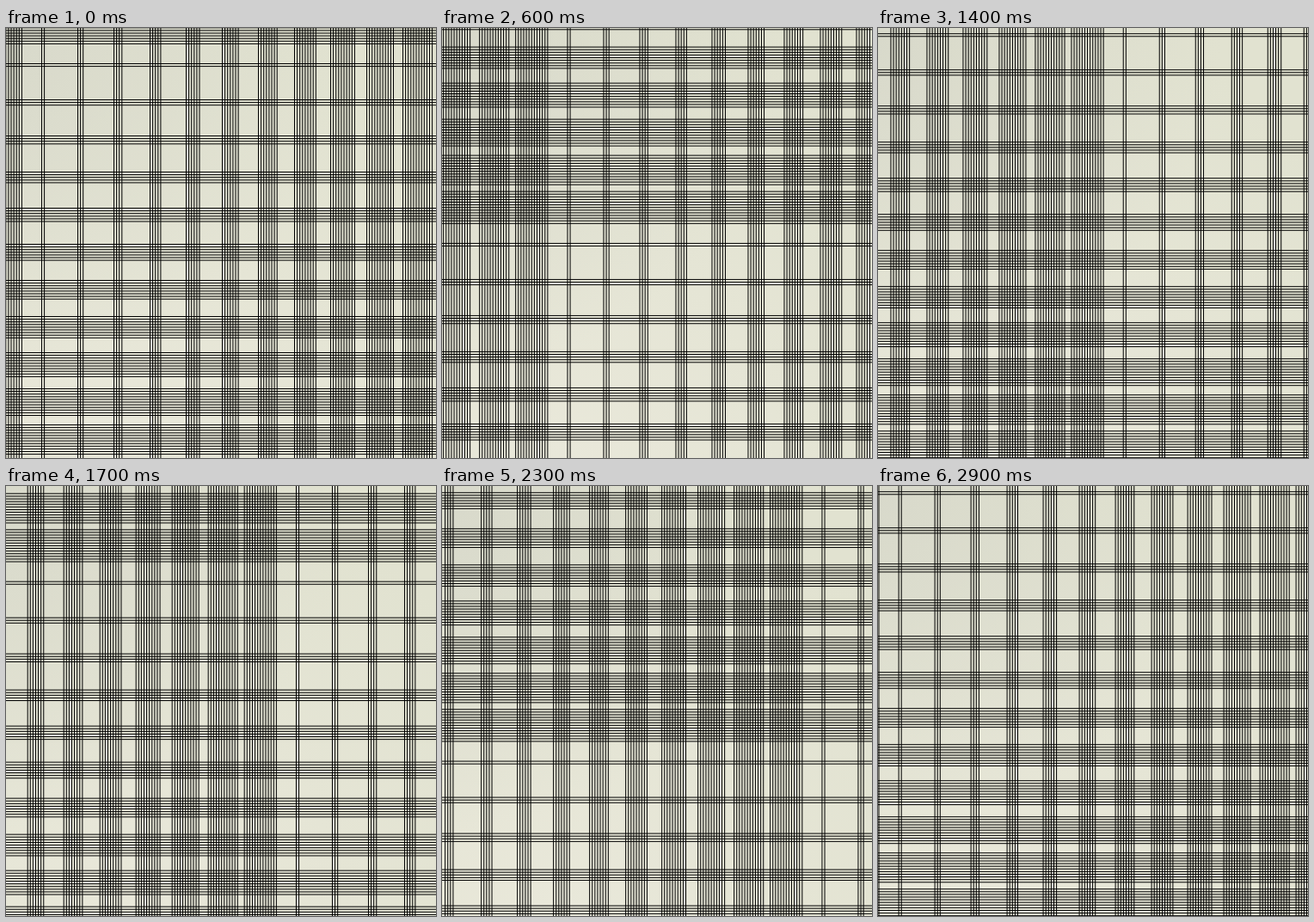
Animation, 500 px wide and 500 px high, one loop 3000 ms. Source, as an HTML page with a canvas:

```html
<!DOCTYPE html>
<html lang="en">
<head>
<meta charset="utf-8">
<title>Plaid</title>
<style>
  html, body { margin: 0; width: 100%; height: 100%; overflow: hidden; background: #e4e3d4; }
  canvas { display: block; }
</style>
</head>
<body>
<canvas id="stage" width="500" height="500"></canvas>
<script>
const SIZE = 500;
const STEP_MS = 100;
const STEPS = 30;
const BANDS = 12;      // bands of 2 to 13 lines
const PITCH = 42;      // start of one band to the next
const SPACING = 3.1;   // between lines of a band
const PERIOD = 522.3;  // length of the whole pattern
const START = -1;
const LINE = 1;

const ctx = document.getElementById('stage').getContext('2d');

function glow(x, y, radius, inner, outer) {
  const gradient = ctx.createRadialGradient(x, y, 0, x, y, radius);
  gradient.addColorStop(0, inner);
  gradient.addColorStop(1, outer);
  return gradient;
}

const paper = glow(130, 500, 520, '#e9e8da', '#e1e2d0');
const shade = glow(0, 0, 400, 'rgba(215, 216, 202, 0.9)', 'rgba(215, 216, 202, 0)');

const offsets = [];
for (let band = 1; band <= BANDS; band++) {
  for (let line = 0; line <= band; line++) {
    offsets.push(START + band * PITCH + line * SPACING);
  }
}

function eachLine(shift, draw) {
  for (const offset of offsets) {
    const position = (offset + shift) % PERIOD;
    draw(position);
    if (position > PERIOD - LINE) draw(position - PERIOD);
  }
}

function render(time) {
  const step = Math.floor(time / STEP_MS) % STEPS;
  const turn = step / STEPS;

  for (const fill of [paper, shade]) {
    ctx.fillStyle = fill;
    ctx.fillRect(0, 0, SIZE, SIZE);
  }

  ctx.fillStyle = '#000';
  eachLine(turn * PERIOD, x => ctx.fillRect(x, 0, LINE, SIZE));
  eachLine(turn * 2 * PERIOD, y => ctx.fillRect(0, y, SIZE, LINE));
}

function tick() {
  render(performance.now());
  requestAnimationFrame(tick);
}

tick();
</script>
</body>
</html>
```
